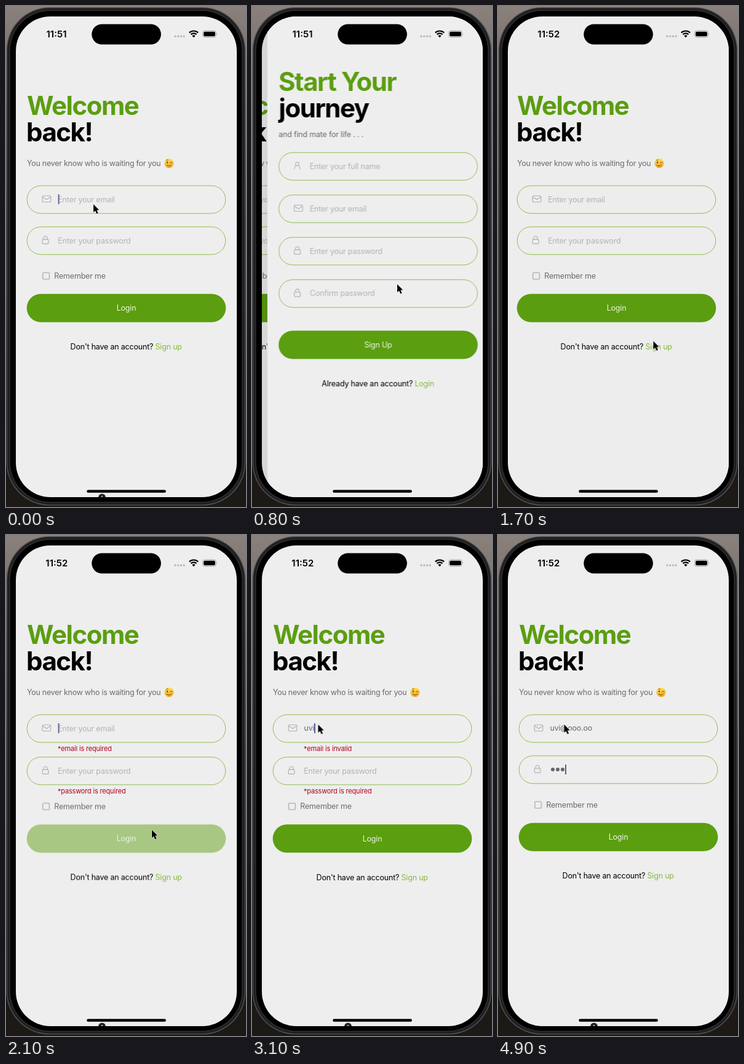
These frames come from a looping animation (390x814 px, 5000 ms). An HTML page:

```html
<!DOCTYPE html>
<html lang="en">
<head>
<meta charset="utf-8">
<title>Login and sign up</title>
<style>
html, body { margin: 0; width: 100%; height: 100%; overflow: hidden; background: #1b1715; }
svg { display: block; width: 100vw; height: 100vh; }
svg, .input {
  font: 400 12.5px/20px Inter, "Liberation Sans", sans-serif;
  letter-spacing: -.2px;
  font-optical-sizing: none;
}
.input { color: #6a6a6e; white-space: nowrap; }
.clock { font-size: 15px; font-weight: 600; letter-spacing: 0; text-anchor: middle; }
.title { font-size: 42px; font-weight: 700; letter-spacing: -.035em; }
.green { fill: #5b9e10; }
.link { fill: #89b840; }
.grey { fill: #6c6a70; }
.hint { fill: #b3b3b6; }
.sub { letter-spacing: -.27px; }
.error { font-size: 11px; letter-spacing: -.18px; fill: #b00020; }
.mid { text-anchor: middle; }
.label { fill: #edf4e3; }
.icon { fill: none; stroke: #b2b2b6; stroke-width: 1.2; stroke-linejoin: round; stroke-linecap: round; }

/* typed characters grow from zero width, so the caret follows them */
.input b { font-size: 0; font-weight: 400; letter-spacing: 0; animation: key 5s step-end var(--t) infinite; }
.input i { display: inline-block; width: 2px; height: 16px; vertical-align: -3.5px; background: #5660a0; }
.dots b { display: inline-block; width: .48em; height: .48em; margin: 0 .08em; border-radius: 50%; vertical-align: .12em; background: #66666b; }
.caret { fill: #66688f; }
@keyframes key { 0% { font-size: 12.5px; letter-spacing: -.2px } 50%, 100% { font-size: 0; letter-spacing: 0 } }

/* hard changes */
.step { animation: 5s step-end infinite; }
.early { animation-name: early; }
.late { animation-name: late; }
.idle { animation-name: idle; }
.mail-caret { animation-name: mailCaret; }
.mail-hint { animation-name: mailHint; }
.mail-text { animation-name: mailText; }
.mail-end { display: inline-block; animation-name: mailEnd; }
.mail-empty { animation-name: mailEmpty; }
.mail-bad { animation-name: mailBad; }
.pass-caret { animation-name: passCaret; }
.pass-hint { animation-name: passHint; }
.pass-text { animation-name: passText; }
.pass-empty { animation-name: passEmpty; }
.pass-row { animation-name: passRow; }
.rest { animation-name: rest; }
@keyframes early { 0% { opacity: 1 } 20%, 100% { opacity: 0 } }
@keyframes late { 0% { opacity: 0 } 20%, 100% { opacity: 1 } }
@keyframes idle { 0% { opacity: 1 } 8.8% { opacity: 0 } 36%, 100% { opacity: 1 } }
@keyframes mailCaret { 0% { opacity: 1 } 8.8% { opacity: 0 } 36% { opacity: 1 } 53.6%, 100% { opacity: 0 } }
@keyframes mailHint { 0% { opacity: 1 } 53.6%, 100% { opacity: 0 } }
@keyframes mailText { 0% { opacity: 0 } 53.6%, 100% { opacity: 1 } }
@keyframes mailEnd { 0% { opacity: 1 } 83.6%, 100% { opacity: 0 } }
@keyframes mailEmpty { 0% { opacity: 0 } 41.6% { opacity: 1 } 53.6%, 100% { opacity: 0 } }
@keyframes mailBad { 0% { opacity: 0 } 53.6% { opacity: 1 } 79.6%, 100% { opacity: 0 } }
@keyframes passCaret { 0% { opacity: 0 } 83.6% { opacity: 1 } 89.6%, 100% { opacity: 0 } }
@keyframes passHint { 0% { opacity: 1 } 89.6%, 100% { opacity: 0 } }
@keyframes passText { 0% { opacity: 0 } 89.6%, 100% { opacity: 1 } }
@keyframes passEmpty { 0% { opacity: 0 } 41.6% { opacity: 1 } 89.6%, 100% { opacity: 0 } }
@keyframes passRow { 0% { transform: none } 41.6% { transform: translateY(2px) } 79.6%, 100% { transform: none } }
@keyframes rest { 0% { transform: none } 41.6% { transform: translateY(.5px) } 89.6%, 100% { transform: none } }

/* page push and pop */
.login, .signup, .dim { animation: 5s linear infinite; }
.login { animation-name: back; }
.signup { animation-name: front; }
.dim { animation-name: dim; }
@keyframes back {
  0%, 9% { transform: translateX(0) }
  12% { transform: translateX(-62px); animation-timing-function: cubic-bezier(.15, .6, .35, 1) }
  18.5% { transform: translateX(-107.7px) }
  29% { transform: translateX(-107.7px); animation-timing-function: cubic-bezier(.25, .6, .3, 1) }
  36%, 100% { transform: translateX(0) }
}
@keyframes front {
  0%, 9% { transform: translateX(359px) }
  12% { transform: translateX(155px); animation-timing-function: cubic-bezier(.15, .6, .35, 1) }
  18.5% { transform: translateX(0) }
  29% { transform: translateX(0); animation-timing-function: cubic-bezier(.25, .6, .3, 1) }
  36%, 100% { transform: translateX(359px) }
}
@keyframes dim {
  0%, 9% { opacity: 0 }
  12% { opacity: .06; animation-timing-function: cubic-bezier(.15, .6, .35, 1) }
  18.5% { opacity: .1 }
  29% { opacity: .1; animation-timing-function: cubic-bezier(.25, .6, .3, 1) }
  36%, 100% { opacity: 0 }
}

/* button presses */
.press-up { animation: pressUp 5s linear infinite; }
.press-in { animation: pressIn 5s linear infinite; }
@keyframes pressUp { 0%, 22.2% { opacity: 1 } 23.9%, 25.2% { opacity: .21 } 29%, 100% { opacity: 1 } }
@keyframes pressIn { 0%, 38.4% { opacity: 1 } 40.2%, 40.8% { opacity: .2 } 42% { opacity: .48 } 45.5%, 100% { opacity: 1 } }

.pointer { animation: pointer 5s ease-in-out infinite; }
@keyframes pointer {
  0% { transform: translate(142px, 322px) }
  6%, 8% { transform: translate(266px, 552px) }
  12% { transform: translate(239.5px, 461px) }
  14%, 18% { transform: translate(236px, 452px) }
  22.4%, 25.2% { transform: translate(261.5px, 553px) }
  27.6%, 30% { transform: translate(268px, 611px) }
  38%, 47% { transform: translate(237px, 479px) }
  53%, 100% { transform: translate(107.5px, 308px) }
}
</style>
</head>
<body>
<svg viewBox="0 0 390 814" preserveAspectRatio="none">
  <defs>
    <linearGradient id="wall" x2="0" y2="1">
      <stop stop-color="#8b817c"/>
      <stop offset=".2" stop-color="#6d6360"/>
      <stop offset=".45" stop-color="#3d3634"/>
      <stop offset=".8" stop-color="#1a1715"/>
      <stop offset="1" stop-color="#1d1916"/>
    </linearGradient>
    <linearGradient id="sun" x2="0" y2="1">
      <stop stop-color="#ffdf5a"/>
      <stop offset="1" stop-color="#f0a526"/>
    </linearGradient>
    <clipPath id="screen"><rect x="16" y="17" width="359" height="781" rx="56"/></clipPath>
    <rect id="field" x="34.2" y="-22.5" width="322.6" height="45" rx="22.5" fill="none" stroke="#92bb4e"/>
    <rect id="button" x="33.7" y="-23" width="323.6" height="46" rx="23" fill="#5b9e10"/>
    <g id="mail" class="icon">
      <rect x="59.2" y="-6" width="13.6" height="10" rx="1.6"/>
      <path d="M59.8 -4.2L66 0L72.2 -4.2"/>
    </g>
    <g id="lock" class="icon">
      <rect x="59.2" y="-2.2" width="9.8" height="7.2" rx="1.4"/>
      <path d="M61.2 -2.2V-4.4a2.9 2.9 0 0 1 5.8 0V-2.2"/>
    </g>
    <g id="user" class="icon">
      <circle cx="64" cy="-3.6" r="2.9"/>
      <path d="M59.2 4.6c.3 -3.6 2.2 -5.3 4.8 -5.3s4.5 1.7 4.8 5.3"/>
    </g>
  </defs>

  <!-- phone body -->
  <rect width="390" height="814" fill="url(#wall)"/>
  <rect x=".8" y="2" width="388.4" height="809.5" rx="70" fill="#555557"/>
  <rect x="2" y="3.2" width="386" height="807" rx="69" fill="#202022"/>
  <rect x="5.6" y="6.8" width="378.8" height="800" rx="66" fill="#39393b"/>
  <rect x="6.6" y="7.8" width="376.8" height="798" rx="65" fill="#000"/>

  <g clip-path="url(#screen)">
    <rect x="16" y="17" width="359" height="781" fill="#eee"/>

    <g class="login">
      <text class="title green" x="34" y="177">Welcome</text>
      <text class="title" x="33" y="219.7">back!</text>
      <text class="grey sub" x="34" y="260">You never know who is waiting for you</text>
      <g fill="none" stroke="#7a4a12" stroke-linecap="round">
        <circle cx="265" cy="255.5" r="7.7" fill="url(#sun)" stroke="none"/>
        <ellipse cx="262" cy="254" rx="1.1" ry="1.6" fill="#6b3f10" stroke="none"/>
        <path d="M266.6 254.6q1.8 -1.6 3.6 -.2M260.6 250.6q1.2 -1 2.6 -.6M261.2 258.4q3.8 3.6 7.4 -.3"/>
      </g>

      <use href="#field" y="314.5"/>
      <use href="#mail" y="314.5"/>
      <text class="hint step mail-hint" x="84.3" y="318.5">Enter your email</text>
      <rect class="caret step mail-caret" x="84.6" y="306" width="2" height="16"/>
      <foreignObject x="84.5" y="304" width="240" height="20">
        <div class="input step mail-text"><b style="--t:2.68s">u</b><b style="--t:2.88s">v</b><b style="--t:2.98s">i</b><b style="--t:3.28s">@</b><b style="--t:3.38s">o</b><b style="--t:3.48s">o</b><b style="--t:3.58s">o</b><b style="--t:3.78s">.</b><b style="--t:3.88s">o</b><b style="--t:3.98s">o</b><i class="step mail-end"></i></div>
      </foreignObject>
      <text class="error step mail-empty" x="84" y="351">*email is required</text>
      <text class="error step mail-bad" x="84" y="351">*email is invalid</text>

      <g class="step pass-row">
        <use href="#field" y="381.3"/>
        <use href="#lock" y="381.3"/>
        <text class="hint step pass-hint" x="84.3" y="385.5">Enter your password</text>
        <rect class="caret step pass-caret" x="84.6" y="373" width="2" height="16"/>
        <foreignObject x="84.5" y="371" width="240" height="20">
          <div class="input dots step pass-text"><b style="--t:4.48s"></b><b style="--t:4.68s"></b><b style="--t:4.88s"></b><i></i></div>
        </foreignObject>
        <text class="error step pass-empty" x="84" y="418">*password is required</text>

        <g class="step rest">
          <rect x="59.8" y="433.2" width="10.6" height="10.6" rx="1.4" fill="none" stroke="#b8b8bb" stroke-width="1.6"/>
          <text class="grey" x="78.3" y="442.7">Remember me</text>
          <g class="press-in">
            <use href="#button" y="490.7"/>
            <text class="mid label" x="195.5" y="495">Login</text>
          </g>
          <text class="mid" x="195.2" y="558">Don't have an account? <tspan class="link">Sign up</tspan></text>
        </g>
      </g>
    </g>

    <g class="step idle">
      <circle cx="156" cy="798.5" r="6" fill="#242424"/>
      <circle cx="156" cy="797" r="1" fill="#ddd"/>
    </g>
    <rect class="dim" x="16" y="17" width="359" height="781"/>

    <g class="signup">
      <rect x="16" y="17" width="359" height="781" fill="#eee"/>
      <text class="title green" x="33.5" y="138">Start Your</text>
      <text class="title" x="34" y="180.7">journey</text>
      <text class="grey" x="33.7" y="213">and find mate for life . . .</text>
      <use href="#field" y="260.6"/>
      <use href="#user" y="260.2"/>
      <text class="hint" x="84.3" y="264.8">Enter your full name</text>
      <use href="#field" y="329.5"/>
      <use href="#mail" y="329.5"/>
      <text class="hint" x="84.3" y="333.7">Enter your email</text>
      <use href="#field" y="398.3"/>
      <use href="#lock" y="398.3"/>
      <text class="hint" x="84.3" y="402.5">Enter your password</text>
      <use href="#field" y="467.2"/>
      <use href="#lock" y="467.2"/>
      <text class="hint" x="84.5" y="471.4">Confirm password</text>
      <g class="press-up">
        <use href="#button" y="550.6"/>
        <text class="mid label" x="195.5" y="555">Sign Up</text>
      </g>
      <text class="mid" x="195.2" y="618">Already have an account? <tspan class="link">Login</tspan></text>
    </g>
  </g>

  <!-- status bar and home indicator -->
  <text class="clock step early" x="82" y="51.3">11:51</text>
  <text class="clock step late" x="82.3" y="51.3">11:52</text>
  <rect x="139.3" y="29.5" width="112.6" height="33" rx="16.5"/>
  <path d="M275 49.3h.01M279.8 49.3h.01M284.5 49.3h.01M289.2 49.3h.01" stroke="#b9b9bb" stroke-width="3.4" stroke-linecap="round"/>
  <g fill="none" stroke="#000" stroke-width="2.2">
    <path d="M297.8 43.4a10.4 10.4 0 0 1 14.4 0"/>
    <path d="M300.4 46.3a6.6 6.6 0 0 1 9.2 0"/>
  </g>
  <path d="M302.4 48.5a3.9 3.9 0 0 1 5.2 0L305 51.2z"/>
  <rect x="319.6" y="40.2" width="21.8" height="10.6" rx="3.4" fill="none" stroke="#a2a2a4"/>
  <rect x="321.1" y="41.7" width="18.8" height="7.6" rx="2.1"/>
  <path d="M342.6 43.8q1.5 1.7 0 3.4z" fill="#a2a2a4"/>
  <rect x="131.3" y="786.2" width="128.6" height="4.6" rx="2.3"/>

  <g class="pointer">
    <path d="M0 0V13.2L3 10.4L5.2 15.6L7.6 14.6L5.4 9.5H9.4Z" stroke="#fff" stroke-width="1.1" stroke-linejoin="round" paint-order="stroke"/>
  </g>
</svg>
</body>
</html>
```
